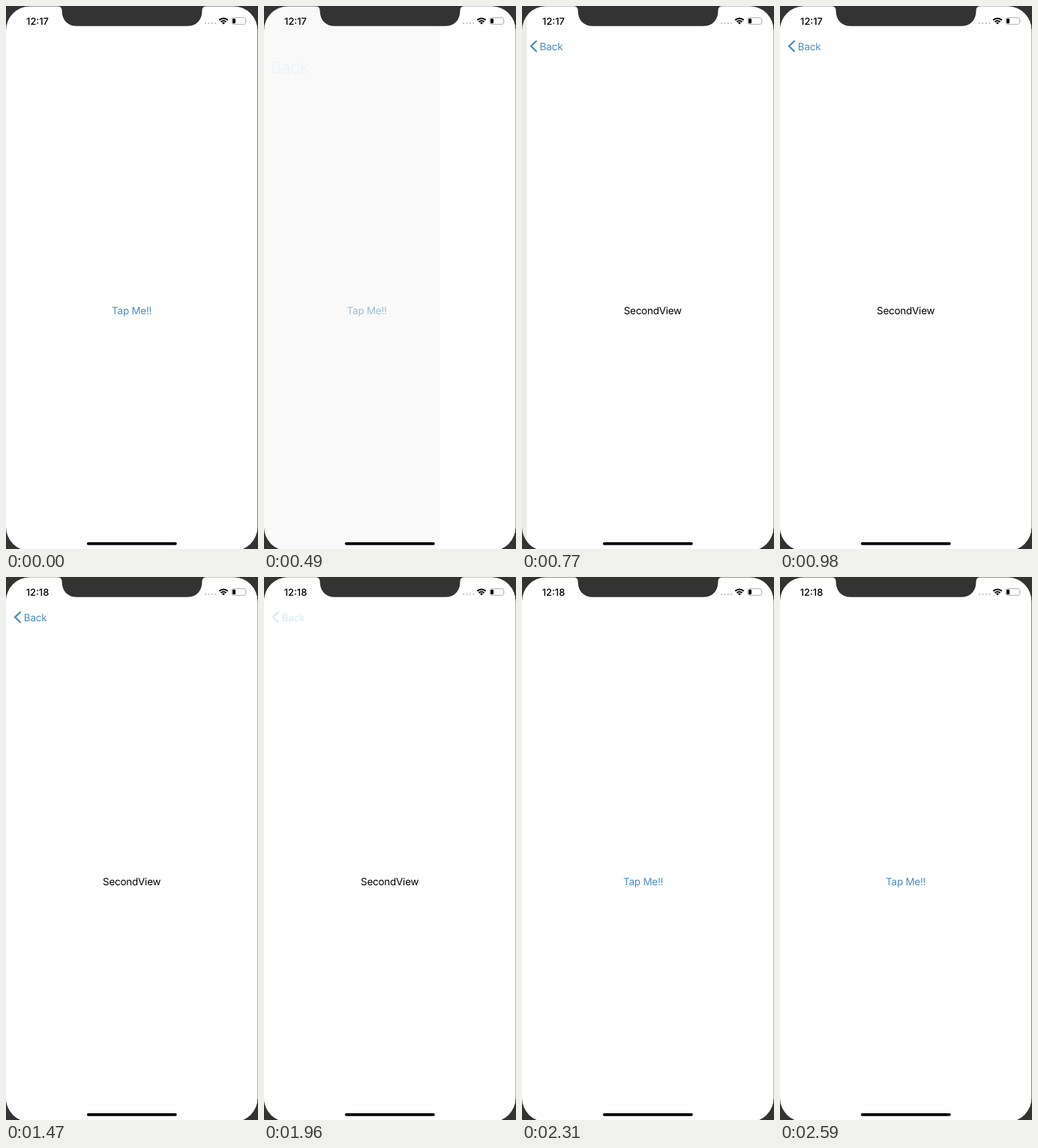
Animation of 336x724 px, one loop 2.87 s. Source, as an HTML page:

```html
<!DOCTYPE html>
<html lang="en">
<head>
<meta charset="utf-8">
<title>Push and pop</title>
<style>
html, body { margin: 0; height: 100%; overflow: hidden; background: #333; }
svg { display: block; width: 336px; height: 724px; }
text { font: 13.4px Inter, sans-serif; letter-spacing: -.2px; text-anchor: middle; text-rendering: geometricPrecision; }
#clock { font-size: 12.9px; font-weight: 550; letter-spacing: 0; }
.link { fill: #4a8dc0; }
</style>
</head>
<body>
<svg viewBox="0 0 336 724">
  <clipPath id="screen"><rect y=".4" width="335.4" height="726.2" rx="32.2"/></clipPath>
  <g clip-path="url(#screen)">
    <rect width="336" height="724" fill="#fff"/>
    <text id="tap" class="link" y="410.6">Tap Me!!</text>
    <rect id="dim" width="336" height="724"/>
    <g id="second">
      <rect width="340" height="724" fill="#fff"/>
      <text x="167.7" y="410.6">SecondView</text>
    </g>
    <path id="chevron" d="M19.6 46.2 12 53.6l7.6 7.4" fill="none" stroke="#4a8dc0" stroke-width="2.2"/>
    <text id="back" class="link" y="4.9">Back</text>
  </g>
  <path d="M69 0Q74.6.6 74.6 6.4C74.6 18.4 82 26.8 95 26.8H241C254 26.8 261.4 18.4 261.4 6.4Q261.4.6 267 0Z" fill="#333"/>
  <text id="clock" x="42" y="24.6"></text>
  <path d="M266 23h15" stroke="#bbb" stroke-width="2.2" stroke-linecap="round" stroke-dasharray="0 4.4"/>
  <g fill="none" stroke="#000" stroke-width="1.9">
    <path d="M284.3 18.8a8.2 8.2 0 0 1 11.4 0M286.5 21.2a5 5 0 0 1 7 0"/>
    <path d="M290 24.6l-2-2a2.8 2.8 0 0 1 4 0Z" fill="#000" stroke="none"/>
  </g>
  <rect x="300.8" y="15.6" width="18.8" height="8.8" rx="2.6" fill="none" stroke="#aaa" stroke-width=".9"/>
  <rect x="302" y="16.8" width="4" height="6.4" rx="1.2"/>
  <path d="M320.8 18.6q1.2 1.4 0 2.8Z" fill="#aaa"/>
  <rect x="107.8" y="714.9" width="120" height="3.9" rx="1.95"/>
</svg>
<script>
const LOOP = 2870, STEP = 70, WIDTH = 336;
const PUSH = 425, POP = 2044;
const $ = id => document.getElementById(id);
const clamp = v => Math.min(1, Math.max(0, v));

// Critically damped spring: distance left, from 1 down to 0
function left(ms) {
  const x = Math.max(0, ms) * .017;
  const r = (1 + x) * Math.exp(-x);
  return r < .00097 ? 0 : r;
}

function tapAlpha(t) {
  return t < 350 || t >= POP ? 1 : .2 + .8 * clamp((t - 350) / 350);
}

function draw(t) {
  const popping = t >= POP;
  const rest = left(t - PUSH);
  const cover = popping ? left(t - POP) : 1 - rest;
  const fade = 1 - clamp((t - POP) / 250);
  const pressed = t < 1960 ? 1 : .2 * fade;

  $('tap').setAttribute('x', 167.7 - .3 * WIDTH * cover);
  $('tap').setAttribute('opacity', tapAlpha(t));
  $('dim').setAttribute('opacity', .08 * cover * fade);
  $('second').setAttribute('transform', `translate(${WIDTH * (1 - cover)})`);

  $('back').setAttribute('transform',
    `translate(${39.1 - 7 * rest} ${53.6 + 40 * rest}) scale(${1 + rest})`);
  $('back').setAttribute('opacity', pressed * clamp((t - 480) / 215));
  $('chevron').setAttribute('opacity', pressed * clamp((t - 630) / 140));
  $('clock').textContent = t < 1470 ? '12:17' : '12:18';
}

function tick() {
  const t = performance.now() % LOOP;
  draw(Math.floor(t / STEP) * STEP);
  requestAnimationFrame(tick);
}
tick();
</script>
</body>
</html>
```
